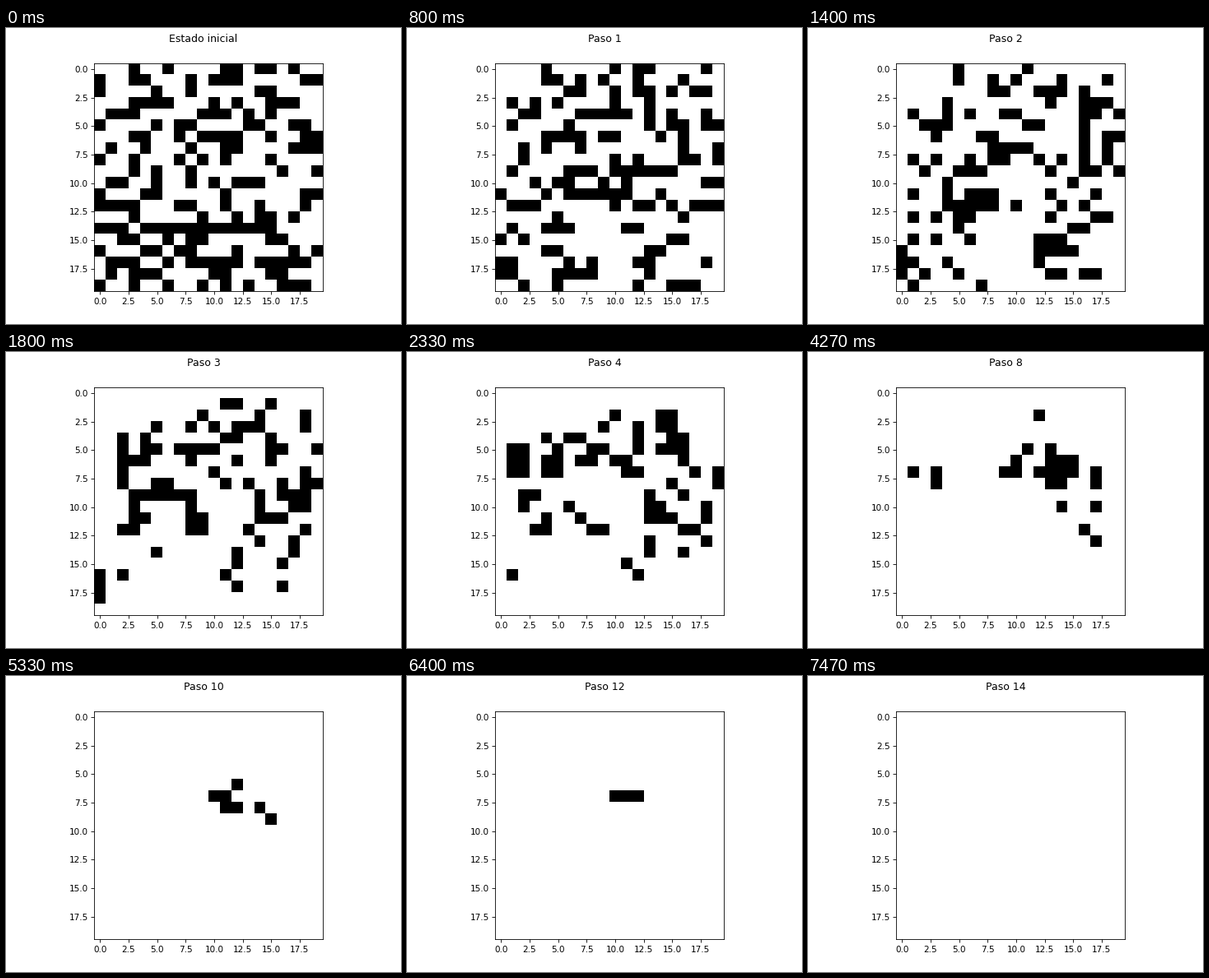
These frames come from a looping animation (480 px wide and 360 px high, 7.99 s). A matplotlib script:

```python
import numpy as np
import matplotlib.pyplot as plt
from matplotlib.animation import FuncAnimation

LOOP_MS = 7990
STEPS = 15

SEED = """
...#..#....##.##.#..
#..##...#.###.....##
#....#..#.....##....
...####...#.#..###..
.###.....###.#.#....
#....#.##....##..##.
...##..#.####..#..##
.#..#...#..##....###
#..#...#.#.#...#....
...#.#..#.......#..#
.##..#..#.#.###.....
#...##.....#......##
####...##..#..#...#.
...#.....#..#.##.#..
###.############....
..##..#.##.....##...
#...##.##...#....#.#
.###..#.#####.#####.
.#.###....##...##...
#..#..#..#.#.#..###.
""".split()


def neighbours(grid):
    """Count the eight neighbours; everything beyond the edge is dead."""
    rows, cols = grid.shape
    pad = np.pad(grid, 1)
    block = sum(pad[r:r + rows, c:c + cols] for r in range(3) for c in range(3))
    return block - grid


def evolve(grid, steps):
    """A cell lives in the next step only with exactly three neighbours."""
    states = [grid]
    while len(states) < steps:
        states.append((neighbours(states[-1]) == 3).astype(int))
    return states


start = np.array([[int(ch == "#") for ch in row] for row in SEED])
states = evolve(start, STEPS)

fig, ax = plt.subplots(figsize=(6.4, 4.8), dpi=75)
image = ax.imshow(start, cmap="binary", vmin=0, vmax=1)
title = fig.suptitle("Estado inicial")


def draw(step):
    image.set_data(states[step])
    title.set_text(f"Paso {step}" if step else "Estado inicial")
    return image, title


anim = FuncAnimation(fig, draw, frames=STEPS, interval=LOOP_MS / STEPS,
                     repeat=True, repeat_delay=0, blit=False)
plt.show()
```
